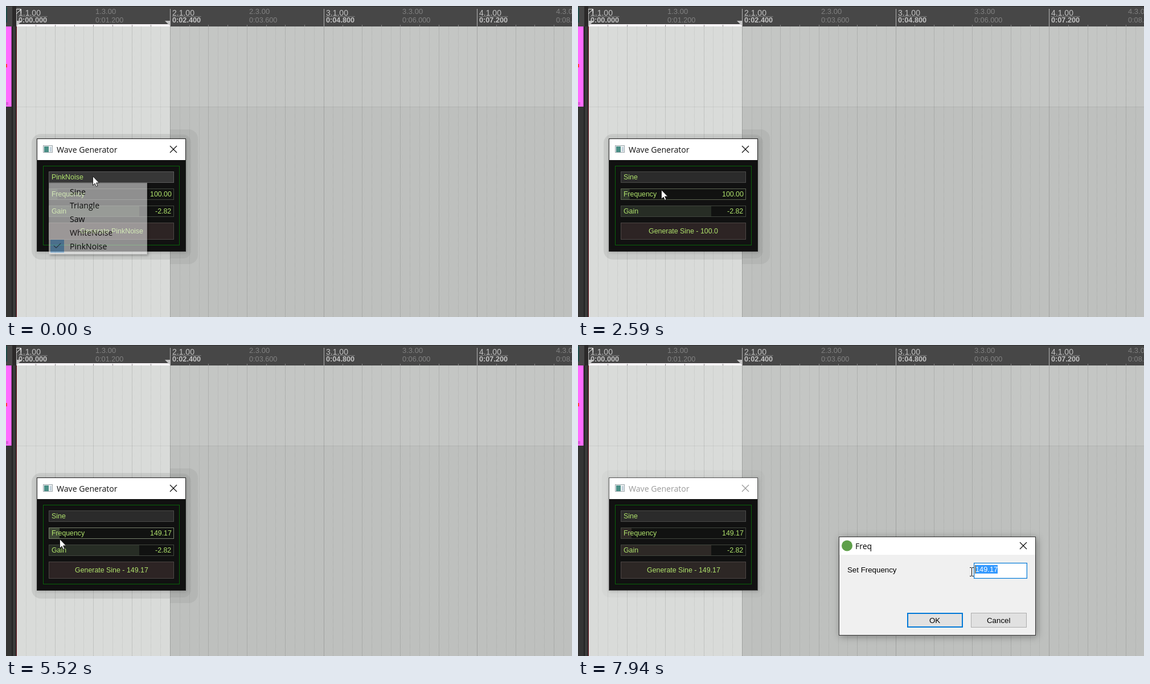
Recreate the animation shown at these times as an HTML page with a canvas. Size 994 by 547 pixels, loop 8000 ms.

```html
<!DOCTYPE html>
<html lang="en">
<head>
<meta charset="utf-8">
<title>Wave Generator</title>
<style>
  html, body { margin: 0; width: 100%; height: 100%; overflow: hidden; background: #bec0be; }
  canvas { display: block; }
</style>
</head>
<body>
<canvas id="stage" width="994" height="547"></canvas>
<script>
const W = 994, H = 547, LOOP = 8000;
const TICK = 400 / 3, FIRST_TICK = 50;   // the screen refreshes 7.5 times a second
const BAR_START = 18.9, BEAT = 67.4;
const screen = document.getElementById('stage').getContext('2d');
const buffer = document.createElement('canvas');
buffer.width = W;
buffer.height = H;
const scratch = buffer.getContext('2d');
let g = screen;

const UI = '"Open Sans", "Noto Sans", sans-serif';
const ARIAL = '"Liberation Sans", sans-serif';
const GREEN = '#b0e36c';
const WAVES = ['Sine', 'Triangle', 'Saw', 'WhiteNoise', 'PinkNoise'];

// What happens when, in ticks
const MENU_OPEN = 1, ITEM_HOVER = 4, PICK = 9, PICK_GONE = 11;
const GRAB = 23, RELEASE = 43, DIALOG = 48, DIALOG_OPEN = 50, CLICK = 55, SELECT = 57;

// Straight pointer moves: from tick, to tick, then x and y reached
const MOVES = [
  [3, 5, 149, 322],
  [18, 19, 146, 323],
  [19, 21, 122, 329],
  [GRAB, 28, 268, 328],
  [28, 31, 154, 336],
  [31, 35, 85, 340],
  [38, 40, 94, 341],
  [RELEASE, 46, 101, 331],
  [49, DIALOG_OPEN, 306, 386],
  [DIALOG_OPEN, 51, 572, 423],
  [51, 54, 730, 401],
  [54, SELECT, 746, 400],
  [SELECT, 59, 691, 399]
];

function pointerAt(tick) {
  let x = 152, y = 299;
  for (const [from, to, toX, toY] of MOVES) {
    const done = Math.min(1, Math.max(0, (tick - from) / (to - from)));
    x += (toX - x) * done;
    y += (toY - y) * done;
  }
  return { x: Math.round(x), y: Math.round(y) };
}
// The slider trails the pointer, and the button label trails the slider
function sliderWidth(tick, lag) {
  if (tick < GRAB) return 220 * Math.sqrt(100 / 20000);
  return pointerAt(Math.min(tick, RELEASE) - lag).x - 75;
}
const frequency = width => 20000 * (width / 220) ** 2;
function shortNumber(value) {
  const rounded = Math.round(value * 100) / 100;
  return Number.isInteger(rounded) ? rounded.toFixed(1) : String(rounded);
}

function rect(x, y, w, h, fill, stroke, lineWidth = 1) {
  if (fill) {
    g.fillStyle = fill;
    g.fillRect(x, y, w, h);
  }
  if (stroke) {
    g.strokeStyle = stroke;
    g.lineWidth = lineWidth;
    const inset = lineWidth / 2;
    g.strokeRect(x + inset, y + inset, w - lineWidth, h - lineWidth);
  }
}
function rounded(x, y, w, h, r, fill) {
  g.fillStyle = fill;
  g.beginPath();
  g.roundRect(x, y, w, h, r);
  g.fill();
}
function shape(path, fill, stroke) {
  const outline = new Path2D(path);
  if (fill) { g.fillStyle = fill; g.fill(outline); }
  if (stroke) { g.strokeStyle = stroke; g.lineWidth = 1; g.stroke(outline); }
}
function line(x1, y1, x2, y2, color, width = 1, dash = []) {
  g.strokeStyle = color;
  g.lineWidth = width;
  g.setLineDash(dash);
  g.beginPath();
  g.moveTo(x1, y1);
  g.lineTo(x2, y2);
  g.stroke();
  g.setLineDash([]);
}
// align is the share of the text's width that lies left of x
function text(string, x, y, size, family, color, align = 0, weight = '') {
  g.font = `${weight} ${size}px ${family}`;
  g.fillStyle = color;
  g.fillText(string, Math.round(x - align * g.measureText(string).width), y);
}
function clipped(x, y, w, h, draw) {
  g.save();
  g.beginPath();
  g.rect(x, y, w, h);
  g.clip();
  draw();
  g.restore();
}
function shadowed(blur, offset, alpha, draw) {
  g.save();
  g.shadowColor = `rgba(0,0,0,${alpha})`;
  g.shadowBlur = blur;
  g.shadowOffsetX = g.shadowOffsetY = offset;
  draw();
  g.restore();
}
// Draws a group that fades as a whole
function layer(alpha, draw) {
  g = scratch;
  g.clearRect(0, 0, W, H);
  draw();
  g = screen;
  g.globalAlpha = alpha;
  g.drawImage(buffer, 0, 0);
  g.globalAlpha = 1;
}
const beatX = beat => Math.floor(BAR_START + beat * BEAT) + .5;

function drawArrange() {
  rect(0, 0, W, H, '#bec0be');
  rect(0, 36, W, 141, '#c4c6c4');
  rect(19, 36, 269, H, '#d9dbd9');
  line(19, 177.5, W, 177.5, 'rgba(0,0,0,.07)');
  for (let beat = .25; beat < 14.5; beat += .25) {
    const alpha = beat % 4 === 0 ? .32 : beat % 1 === 0 ? .22 : .1;
    line(beatX(beat), 36, beatX(beat), H, `rgba(0,0,0,${alpha})`, 1, [1, 1]);
  }
}

function drawTrackPanel() {
  rect(0, 36, 19, H, '#343434');
  rect(0, 36, 10, 141, '#ff6cff');
  rect(9, 36, 1, 141, '#b44ab4');
  rect(0, 102, 2, 6, '#ff4040');
  rect(0, 169, 4, 5, '#d95bd9');
  rect(10, 36, 2, H, '#222');
  rect(12, 36, 5, H, '#3a3a3a');
  rect(17, 36, 1, H, '#231c1c');
  rect(18, 36, 1, H, '#6e1c28');
}

function drawRuler() {
  rect(0, 0, W, 36, '#474747');
  rect(0, 0, W, 1, '#2c2c2c');
  rect(0, 2, 2, 27, '#1d4a47');
  rect(11, 0, 7, 36, '#2b2929');
  rect(19, 32, 269, 4, '#fbf6fa');
  for (let beat = 0; beat < 14.5; beat += .5) {
    const x = beatX(beat);
    const major = beat % 4 === 0;
    line(x, major ? 5 : 33, x, 36, major ? '#b5b5b5' : '#8a8a8a');
    if (beat % 2) continue;
    const color = major ? '#c2c2c2' : '#808080';
    const bar = `${1 + Math.floor(beat / 4)}.${1 + beat % 4}.00`;
    text(bar, x + 3.5, major ? 17 : 14, major ? 14 : 13, ARIAL, color);
    text('0:0' + (beat * .6).toFixed(3), x + 3.5, 29, 12.7, ARIAL, color, 0, major ? 'bold' : '');
    if (major) line(x + 3, 18.5, x + 54, 18.5, '#808080');
  }
  shape('M19 26h9l-9 9z M279 26h9v9z', '#c4c4c4');
  shape('M18 5.5h8.5v8 M18 14l8-8', null, '#f0f0f0');
}

function drawWindowShadow(focused) {
  if (focused) {
    clipped(19, 36, 269, H, () => rounded(45, 225, 280, 221, 16, 'rgba(0,0,0,.08)'));
    clipped(288, 36, 300, H, () => {
      rounded(45, 217, 292, 237, 16, 'rgba(0,0,0,.05)');
      rounded(45, 226, 280, 218, 14, 'rgba(0,0,0,.05)');
    });
  } else {
    rounded(42, 220, 286, 224, 14, 'rgba(0,0,0,.025)');
  }
  shadowed(6, 1, .2, () => rect(54, 233, 262, 199, '#222'));
}

function drawClose(x, y, color) {
  line(x - 6, y - 6, x + 6, y + 6, color, 1.2);
  line(x - 6, y + 6, x + 6, y - 6, color, 1.2);
}

function drawSlider(y, width, label, value, look) {
  rect(75, y, 220, 20, '#111211');
  rect(75, y, width, 20, look.fill);
  rect(75, y, 220, 20, null, look.border);
  text(label, 80, y + 14, 12.3, ARIAL, GREEN);
  text(value, 290.5, y + 14, 12.4, ARIAL, GREEN, 1);
}

function drawGenerator(tick) {
  const focused = tick < DIALOG;
  const picked = tick >= PICK;
  const wave = picked ? 'Sine' : 'PinkNoise';
  const dragging = tick >= GRAB && tick <= RELEASE;
  const ink = focused ? '#111' : '#999';

  drawWindowShadow(focused);
  rect(54, 233, 262, 199, '#111', focused ? '#222' : '#555');
  rect(55, 234, 260, 37, '#fff');
  rect(65, 245, 17, 13, '#eef1f2', '#9aa5aa');
  rect(67, 247, 8, 10, '#4a8f86');
  rect(77, 248, 3, 8, '#c3d2dc');
  text('Wave Generator', 89, 258, 14.1, UI, ink);
  drawClose(294, 252, ink);

  rect(65, 281, 240, 140, null, '#0a620a');
  rect(75, 291, 220, 20, picked ? '#2b2b2b' : '#373737', picked ? '#4a4a48' : '#5c5c5c');
  text(wave, 80, 305, 12.4, ARIAL, GREEN);

  const idle = { fill: focused ? '#272d25' : '#2e2926', border: '#41463e' };
  const live = { fill: dragging ? '#3d4735' : '#30382d', border: dragging ? '#77806c' : '#5d6652' };
  const width = sliderWidth(tick, .37);
  drawSlider(321, width, 'Frequency', frequency(width).toFixed(2), picked && focused ? live : idle);
  drawSlider(351, 159, 'Gain', '-2.82', idle);

  rect(75, 381, 220, 30, focused ? '#2d2424' : '#2d2725', '#4c4644');
  const detail = picked ? ' - ' + shortNumber(frequency(sliderWidth(tick, .63))) : '';
  text(`Generate ${wave}${detail}`, 185, 400, 12.4, ARIAL, GREEN, .5);
}

function drawMenuItem(name, row, highlighted) {
  if (highlighted) rect(78, 314 + 24 * row, 167, 24, '#91c9f7');
  text(name, 112, 332 + 24 * row, 14.1, UI, '#000');
}

function drawMenu(tick) {
  if (tick >= PICK_GONE) return;
  if (tick >= PICK) {
    layer(tick === PICK ? .54 : .2, () => drawMenuItem(WAVES[0], 0, true));
    return;
  }
  layer(tick < MENU_OPEN ? .57 : 1, () => {
    shadowed(4, 2, .5, () => rect(75, 311, 173, 126, '#eee'));
    rect(75, 311, 173, 126, '#eee', '#ccc');
    rect(78, 411, 24, 23, '#78b6ea');
    shape('M84 421.5l4 4l8-8', null, '#111');
    WAVES.forEach((name, row) => drawMenuItem(name, row, row === 0 && tick >= ITEM_HOVER));
  });
}

function drawField(tick) {
  const left = 698, right = 737;
  const value = color => text('149.17', left, 399, 12.8, ARIAL, color);
  rect(695, 383, 94, 28, '#fff', '#0078d7', 1.2);
  value('#000');
  if (tick > SELECT) {
    const from = Math.max(left, pointerAt(tick).x);
    rect(from, 387, right - from, 15, '#3399ff');
    clipped(from, 387, right - from, 15, () => value('#fff'));
    rect(from - 1, 387, 1, 15, '#cc6600');
  } else {
    rect(tick < CLICK ? left : right, 387, 1, 15, '#111');
  }
}

function drawButton(x, label, selected) {
  rect(x, 471, 98, 26, '#e1e1e1', selected ? '#0078d7' : '#adadad', selected ? 2 : 1);
  text(label, x + 49, 489, 13.3, ARIAL, '#000', .5);
}

function drawDialog(tick) {
  if (tick < DIALOG) return;
  // Fades in while growing, easing out
  const missing = Math.max(0, DIALOG_OPEN - tick) / 2;
  const scale = 1 - .029 * missing ** 2.5;
  layer(1 - .5 * missing ** 2.8, () => {
    g.save();
    g.translate(630.5, 424);
    g.scale(scale, scale);
    g.translate(-630.5, -424);
    shadowed(12, 2, .35 * (1 - missing), () => rect(458, 337, 346, 174, '#333'));
    rect(459, 338, 344, 172, '#f0f0f0');
    rect(459, 338, 344, 31, '#fff');
    rounded(463, 343.5, 19, 19, 9.5, '#5fa04a');
    text('Freq', 487, 359, 14, UI, '#000');
    drawClose(782, 353, '#111');
    text('Set Frequency', 473, 400, 13.3, ARIAL, '#000');
    drawField(tick);
    drawButton(578, 'OK', true);
    drawButton(690, 'Cancel', false);
    g.restore();
  });
}

function drawPointer(tick) {
  const { x, y } = pointerAt(tick);
  const overField = x > 690;
  g.save();
  g.translate(x, y);
  if (overField) shape('M.5 -7v14 M-3 -7.5h3m1 0h3 M-3 7.5h3m1 0h3', null, '#111');
  else shape('M.5 .5v16l3.5-3.5l2.5 5.5l2.5-1l-2.5-5.5h5z', '#fff', '#222');
  g.restore();
}

function render(time) {
  const tick = Math.floor((time - FIRST_TICK) / TICK);
  drawArrange();
  drawTrackPanel();
  drawRuler();
  drawGenerator(tick);
  drawMenu(tick);
  drawDialog(tick);
  drawPointer(tick);
}

const start = performance.now();
function animate() {
  render((performance.now() - start) % LOOP);
  requestAnimationFrame(animate);
}
animate();
</script>
</body>
</html>
```
